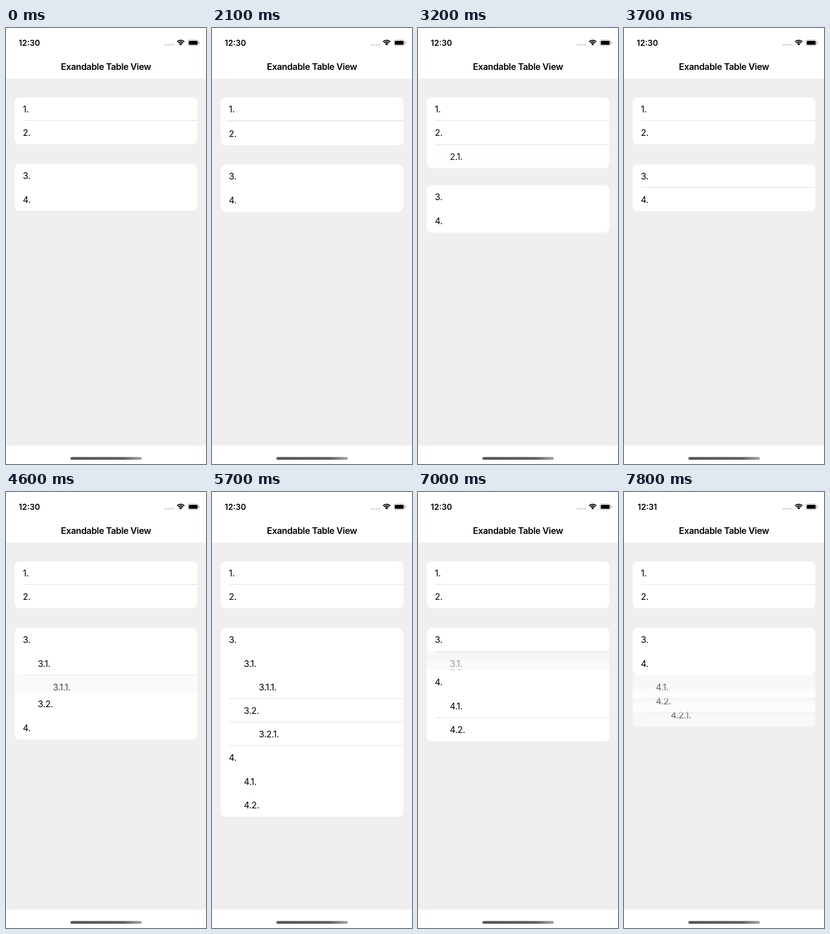
An HTML page with a canvas for the animation above (7900 ms loop, 360 px wide and 780 px high).

```html
<!DOCTYPE html>
<html lang="en">
<head>
<meta charset="utf-8">
<title>Expandable table</title>
<style>
  html, body { margin: 0; width: 100%; height: 100%; overflow: hidden; background: #fff; }
  canvas { display: block; width: 360px; height: 780px; }
</style>
</head>
<body>
<canvas></canvas>
<script>
const LOOP = 7900, STEP = 100, DURATION = 300;
const ROW = 42.2, GAP = 34.7, TOP = 124, LEFT = 15.5, RIGHT = 344.5, RADIUS = 9;
const SECTIONS = [
  ['1.', '1.1.', '2.', '2.1.'],
  ['3.', '3.1.', '3.1.1.', '3.2.', '3.2.1.', '4.', '4.1.', '4.2.', '4.2.1.'],
];
// [start, row, opens]
const TAPS = [
  [2068, '1.', true], [2448, '1.', false],
  [2960, '2.', true], [3421, '2.', false],
  [3960, '3.', true], [4405, '3.1.', true], [4860, '3.2.', true], [5360, '4.', true],
  [5903, '3.1.', false], [6360, '3.2.', false], [6831, '3.', false],
  [7203, '4.2.', true], [7669, '4.', false],
];

const canvas = document.querySelector('canvas');
const ctx = canvas.getContext('2d');
const scale = window.devicePixelRatio || 1;
canvas.width = 360 * scale;
canvas.height = 780 * scale;
ctx.scale(scale, scale);

const parentOf = name => name.replace(/\d+\.$/, '');
const depthOf = name => name.split('.').length - 2;
const ease = x => (1 - Math.cos(Math.PI * Math.min(1, x))) / 2;

function box(x, y, w, h, radii, color) {
  ctx.fillStyle = color;
  ctx.beginPath();
  ctx.roundRect(x, y, w, h, radii);
  ctx.fill();
}

function text(str, x, y, size, weight, align, spacing) {
  ctx.font = `${weight} ${size}px Inter, sans-serif`;
  ctx.letterSpacing = spacing + 'px';
  ctx.textAlign = align;
  ctx.fillStyle = '#000';
  ctx.fillText(str, x, y);
}

// Whether a row is meant to be open at time t, and how far it has got
function rowState(name, t) {
  let open = depthOf(name) === 0, shown = open ? 1 : 0;
  for (const [start, key, opens] of TAPS) {
    if (start > t) break;
    const hit = opens ? parentOf(name) === key : open && name !== key && name.startsWith(key);
    if (!hit) continue;
    const p = ease((t - start) / DURATION);
    open = opens;
    shown = opens ? p : 1 - p;
  }
  return { name, open, shown };
}

function drawRow({ name, y, shown, first, last }) {
  const top = Math.round(y), bottom = Math.round(y + ROW);
  const a = first ? RADIUS : 0, b = last ? RADIUS : 0;
  ctx.globalAlpha = shown;
  box(LEFT, top, RIGHT - LEFT, bottom - top, [a, a, b, b], '#fff');
  if (!last) box(31, Math.round(y + ROW - 0.75), RIGHT - 31, 1, 0, '#e1e1e1');
  text(name, 30.3 + 27 * depthOf(name), y + 27.2, 16, 400, 'left', -0.35);
  ctx.globalAlpha = 1;
}

function drawTable(t) {
  let y = TOP;
  for (const names of SECTIONS) {
    const rows = names.map(name => rowState(name, t)).filter(row => row.shown > 0);
    const lastOpen = rows.filter(row => row.open).pop();
    rows.forEach((row, i) => {
      row.y = y;
      row.first = i === 0;
      row.last = row === lastOpen || i === rows.length - 1;
      y += ROW * row.shown;
    });
    rows.filter(row => row.shown < 1).reverse().forEach(drawRow);
    rows.filter(row => row.shown === 1).forEach(drawRow);
    y += GAP;
  }
}

function drawStatusBar(t) {
  text(t < 7200 ? '12:30' : '12:31', 42, 31.5, 14.4, 600, 'center', 0);
  for (let i = 0; i < 4; i++) box(286 + i * 4.4, 28.4, 3.2, 3.2, 1.6, '#c9c9c9');

  ctx.strokeStyle = ctx.fillStyle = '#000';
  ctx.lineWidth = 2;
  const fan = r => ctx.arc(314.5, 31.2, r, -Math.PI * 0.75, -Math.PI * 0.25);
  for (const r of [6.2, 9.3]) {
    ctx.beginPath();
    fan(r);
    ctx.stroke();
  }
  ctx.beginPath();
  ctx.moveTo(314.5, 31.2);
  fan(3.9);
  ctx.fill();

  ctx.strokeStyle = '#a6a6a6';
  ctx.lineWidth = 1;
  ctx.beginPath();
  ctx.roundRect(327.5, 21.5, 19, 10, 3);
  ctx.stroke();
  box(329, 23, 16, 7, 1.5, '#000');
  box(347.6, 24.6, 1.4, 3.8, [0, 1, 1, 0], '#a6a6a6');
}

function drawHomeBar() {
  const shade = ctx.createLinearGradient(116, 0, 244, 0);
  shade.addColorStop(0, '#555');
  shade.addColorStop(0.75, '#606060');
  shade.addColorStop(1, '#a5a5a5');
  box(116, 767.5, 128.5, 5, 2.5, shade);
}

function draw() {
  const t = Math.floor(performance.now() % LOOP / STEP) * STEP;
  box(0, 0, 360, 780, 0, '#fff');
  box(0, 90.5, 360, 656.5, 0, '#efefef');
  drawStatusBar(t);
  text('Exandable Table View', 180, 75, 16, 600, 'center', -0.35);
  drawTable(t);
  drawHomeBar();
  requestAnimationFrame(draw);
}
draw();
</script>
</body>
</html>
```
